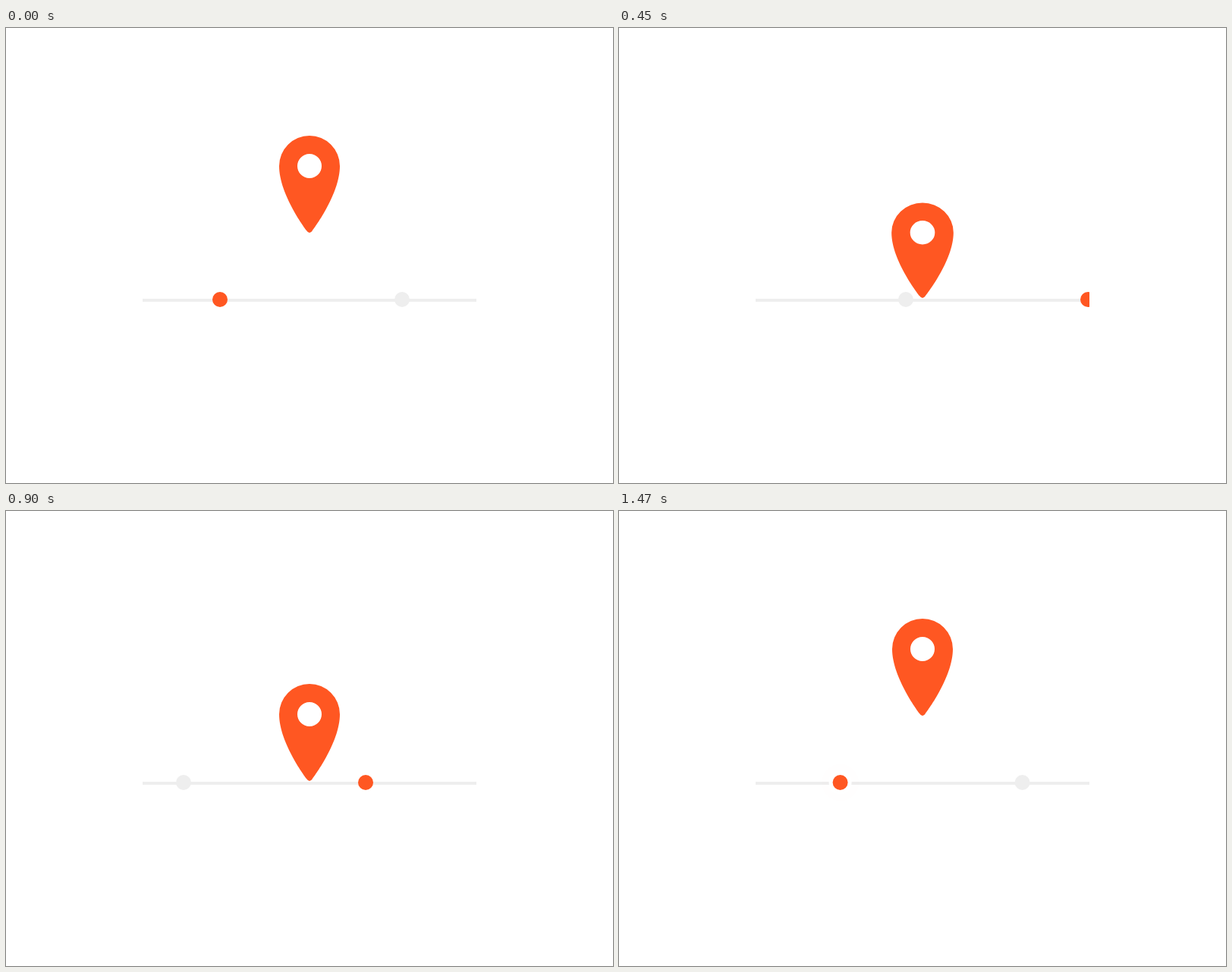
These frames come from a looping animation (800 px wide and 600 px high, 1.5 s). An HTML page with a canvas:

```html
<!DOCTYPE html>
<html lang="en">
<head>
<meta charset="utf-8">
<title>Travelling map pin</title>
<style>
  html, body { margin: 0; width: 100%; height: 100%; overflow: hidden; background: #fff; }
  canvas { display: block; width: 800px; height: 600px; }
</style>
</head>
<body>
<canvas id="stage" width="800" height="600"></canvas>
<script>
const ctx = document.getElementById('stage').getContext('2d');

const LOOP = 1500, STEP = 30;
const ORANGE = '#ff5722', GRAY = '#eeeeee';
const TRACK = { left: 180, right: 620, y: 358 };
const SPACING = 480, DOT_RADIUS = 10;
const PIN_X = 400, GROUND = 356, DROP = 86;
const LIFT_OFF = 1050;

const clamp = v => Math.min(1, Math.max(0, v));
const progress = (t, from, to) => clamp((t - from) / (to - from));
const easeOut = u => Math.sin(u * Math.PI / 2);
const easeInOut = u => (1 - Math.cos(u * Math.PI)) / 2;

// CSS-style cubic Bezier easing, solved by bisection.
function bezierEase(x1, y1, x2, y2) {
  const curve = (a, b, s) => 3 * a * s * (1 - s) ** 2 + 3 * b * s * s * (1 - s) + s ** 3;
  return u => {
    if (u <= 0 || u >= 1) return clamp(u);
    let low = 0, high = 1;
    for (let i = 0; i < 24; i++) {
      const mid = (low + high) / 2;
      if (curve(x1, x2, mid) < u) low = mid; else high = mid;
    }
    return curve(y1, y2, low);
  };
}
const ease = bezierEase(0.25, 0.1, 0.25, 1);

// Smooth interpolation through [time, value] keys.
function track(keys, t) {
  if (t <= keys[0][0]) return keys[0][1];
  for (let i = 1; i < keys.length; i++) {
    const [t0, v0] = keys[i - 1], [t1, v1] = keys[i];
    if (t <= t1) return v0 + (v1 - v0) * easeInOut((t - t0) / (t1 - t0));
  }
  return keys[keys.length - 1][1];
}

const HOP = [[240, 0], [335, 9.5], [435, 0]];
const STRETCH = [[165, 1], [235, 0.9], [335, 1.08], [450, 0.98], [545, 0.95], [700, 1]];

const pin = new Path2D(
  'M-40 -88 A40 40 0 0 1 40 -88 C40 -50 4 -3 4 -3 Q0 3 -4 -3 C-4 -3 -40 -50 -40 -88 Z ' +
  'M16 -88 A16 16 0 1 0 -16 -88 A16 16 0 1 0 16 -88 Z');

function disc(x, y, radius, color) {
  ctx.fillStyle = color;
  ctx.beginPath();
  ctx.arc(x, y, radius, 0, Math.PI * 2);
  ctx.fill();
}

function drawTrack(t) {
  const { left, right, y } = TRACK;
  ctx.save();
  ctx.beginPath();
  ctx.rect(left, 0, right - left, 600);
  ctx.clip();
  ctx.fillStyle = GRAY;
  ctx.fillRect(left, y - 1, right - left, 4);

  const shift = t / LOOP * SPACING;
  const pulse = easeOut(progress(t, LIFT_OFF, LOOP));
  for (const offset of [0, SPACING]) {
    const orangeX = 282 - shift + offset;
    if (pulse > 0 && pulse < 1) {
      const gap = DOT_RADIUS + 5 * pulse;
      disc(orangeX, y, gap, '#fff');
      ctx.fillStyle = `rgba(255, 87, 34, ${1 - pulse})`;
      ctx.beginPath();
      ctx.arc(orangeX, y, DOT_RADIUS + 15 * pulse, 0, Math.PI * 2);
      ctx.arc(orangeX, y, gap, 0, Math.PI * 2, true);
      ctx.fill();
    }
    disc(orangeX, y, DOT_RADIUS, ORANGE);
    disc(522 - shift + offset, y, DOT_RADIUS, GRAY);
  }
  ctx.restore();
}

function drawPin(t) {
  const fall = progress(t, 0, 180);
  const rise = easeOut(progress(t, LIFT_OFF, 1374));
  const height = DROP * (1 - fall + rise) + track(HOP, t);
  const stretch = track(STRETCH, t);
  const turn = Math.abs(Math.cos(Math.PI * ease(progress(t, LIFT_OFF, LOOP))));
  ctx.save();
  ctx.translate(PIN_X, GROUND - height);
  ctx.scale(turn / stretch, stretch);
  ctx.fillStyle = ORANGE;
  ctx.fill(pin, 'evenodd');
  ctx.restore();
}

function render() {
  const t = Math.floor(performance.now() % LOOP / STEP) * STEP;
  ctx.fillStyle = '#fff';
  ctx.fillRect(0, 0, 800, 600);
  drawTrack(t);
  drawPin(t);
  requestAnimationFrame(render);
}
render();
</script>
</body>
</html>
```
